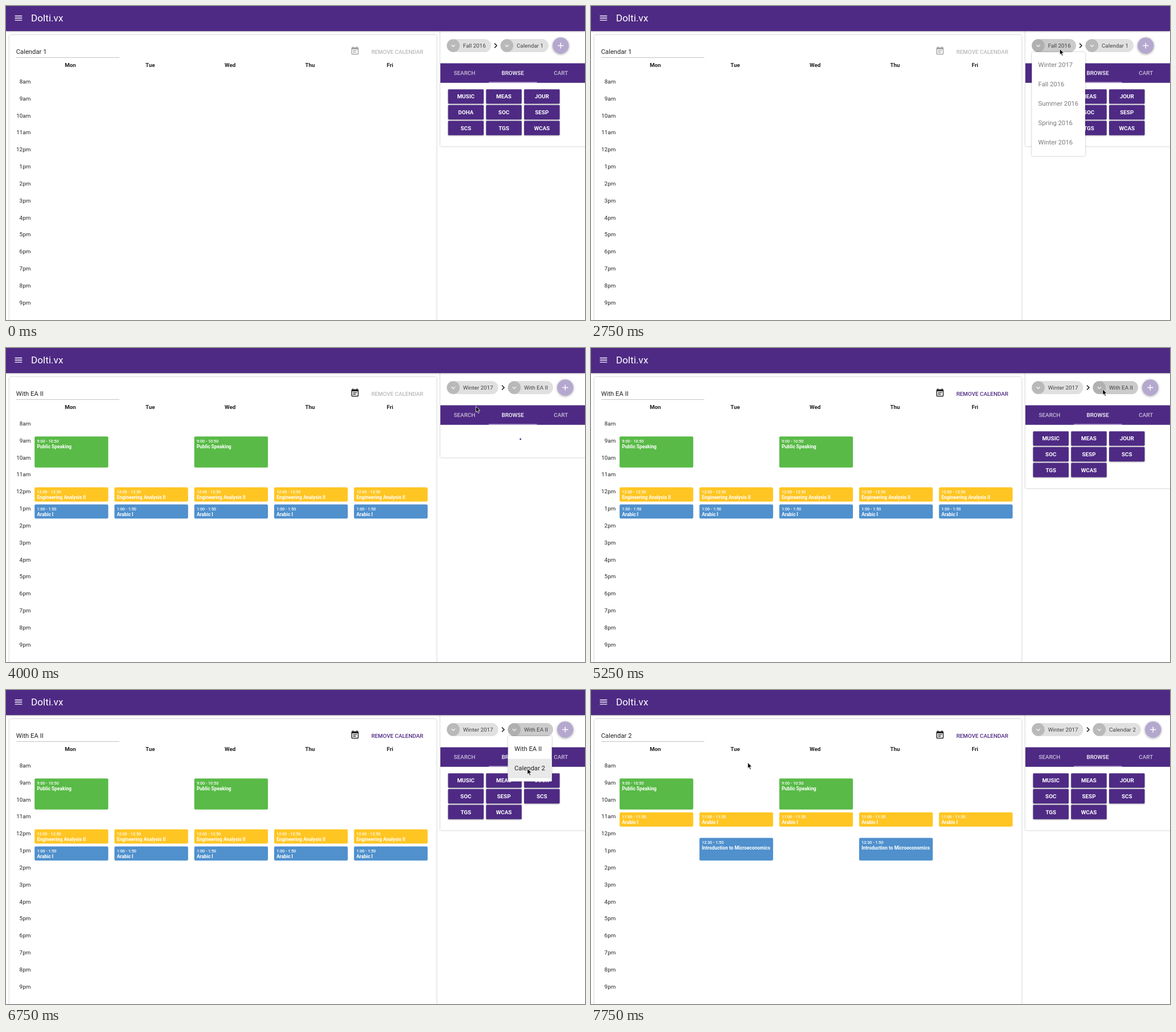
An HTML page that plays this animation: 1017x551 px, repeating every 8 s.

```html
<!DOCTYPE html>
<html lang="en">
<head>
<meta charset="utf-8">
<title>Class calendar</title>
<style>
  html, body { margin: 0; width: 100%; height: 100%; overflow: hidden; background: #fff; }
  svg { display: block; font-family: Roboto, Arial, sans-serif; font-size: 9.86px; }
  .card { fill: #fff; filter: drop-shadow(0 .7px 1.5px rgba(0, 0, 0, .3)); }
  .raised { filter: drop-shadow(0 1px 1px rgba(0, 0, 0, .3)); }
  .fab { filter: drop-shadow(0 1.5px 2px rgba(0, 0, 0, .35)); }
</style>
</head>
<body>
<svg id="stage" width="1017" height="551" viewBox="0 0 1017 551"></svg>
<script>
const stage = document.getElementById('stage');
const LOOP = 8000, PURPLE = '#4e2a84', INK = '#212121';
const GREEN = '#59ba47', AMBER = '#ffc522', BLUE = '#4f90cd';

// Pointer positions: start time, x, y
const pointer = [
  [500, 717, 48], [750, 782, 73], [1000, 797, 71], [1250, 799, 72],
  [1750, 824, 88], [2000, 823, 77], [2250, 823, 75], [3000, 824, 78],
  [3250, 825, 98], [3500, 825, 102], [4750, 870, 87], [5000, 896, 71],
  [5250, 898.5, 72], [6250, 912, 104], [6500, 915.5, 137.5], [7750, 275, 127]
];
const times = [...new Set([0, 2750, 4000, 4250, 5750, 6000, 7250, ...pointer.map(p => p[0])])]
  .sort((a, b) => a - b);

const ALL = [0, 1, 2, 3, 4];
// Courses: days, start hour, end hour, time label, title, colour
const speaking = [[0, 2], 9, 10 + 5 / 6, '9:00 - 10:50', 'Public Speaking', GREEN];
const calendars = [
  { term: 'Fall 2016', name: 'Calendar 1', chip2: 868.5, end: 953, courses: [] },
  { term: 'Winter 2017', name: 'With EA II', chip2: 881.5, end: 961, courses: [
    speaking,
    [ALL, 12, 12 + 5 / 6, '12:00 - 12:50', 'Engineering Analysis II', AMBER],
    [ALL, 13, 13 + 5 / 6, '1:00 - 1:50', 'Arabic I', BLUE]] },
  { term: 'Winter 2017', name: 'Calendar 2', chip2: 881.5, end: 966, courses: [
    speaking,
    [ALL, 11, 11 + 5 / 6, '11:00 - 11:50', 'Arabic I', AMBER],
    [[1, 3], 12.5, 13 + 5 / 6, '12:30 - 1:50', 'Introduction to Microeconomics', BLUE]] }
];
const terms = ['Winter 2017', 'Fall 2016', 'Summer 2016', 'Spring 2016', 'Winter 2016'];

const rect = (x, y, w, h, fill, more = '') =>
  `<rect x="${x}" y="${y}" width="${w}" height="${h}" fill="${fill}" ${more}/>`;
const text = (x, y, s, fill = INK, more = '') =>
  `<text x="${x}" y="${y}" fill="${fill}" ${more}>${s}</text>`;
const line = (d, color, width) =>
  `<path d="${d}" fill="none" stroke="${color}" stroke-width="${width}"/>`;
const MID = 'text-anchor="middle"', BIG = 'font-size="11.27"';
const MEDIUM = MID + ' font-weight="500"', BOLD = MID + ' font-weight="700"';

function header() {
  return rect(0, 0, 1017, 44, PURPLE, 'class="raised"') +
    line('M15.6 17.5h12.7m-12.7 3.7h12.7m-12.7 3.7h12.7', '#fff', 1.4) +
    text(44, 27, 'Dolti.vx', '#fff', 'font-size="17.2"');
}

function course([days, from, to, label, title, color]) {
  const y = 125.3 + (from - 8) * 29.83;
  return days.map(d => {
    const x = 50.2 + d * 140.25;
    return rect(x, y, 129.4, (to - from) * 29.83, color, 'rx="2.2"') +
      text(x + 4.2, y + 10.7, label, '#fff', 'font-size="7.2" font-weight="500"') +
      text(x + 4.2, y + 20.6, title, '#fff', 'font-size="8.4" font-weight="700"');
  }).join('');
}

function calendar(cal, t) {
  let out = rect(6, 51, 750, 520, '#fff', 'class="card" rx="1.4"') +
    text(17.7, 83.7, cal.name, INK, BIG) + rect(18, 90, 181, .8, '#b5b5b5') +
    `<path transform="translate(604.5 70.4) scale(.704)" fill="${t < 4000 ? '#a3a3a3' : INK}" fill-rule="evenodd"
      d="M17 10H7v2h10zM19 3h-1V1h-2v2H8V1H6v2H5a2 2 0 0 0-2 2v14a2 2 0 0 0 2 2h14a2 2 0 0 0 2-2V5a2 2 0 0 0-2-2zm0 16H5V8h14zm-5-5H7v2h7z"/>` +
    text(687.3, 83.5, 'REMOVE CALENDAR', t < 4250 ? '#b9b9b9' : PURPLE, MEDIUM);
  ['Mon', 'Tue', 'Wed', 'Thu', 'Fri'].forEach((d, i) => out += text(113 + i * 140.35, 107.3, d, INK, BOLD));
  for (let i = 0; i < 14; i++)
    out += text(43.3, 136 + i * 29.83, (i + 7) % 12 + 1 + (i < 4 ? 'am' : 'pm'), INK, 'text-anchor="end"');
  return out + cal.courses.map(course).join('');
}

function chip(x, end, label, hover) {
  return rect(x, 58, end - x, 23, hover ? '#cbcbcb' : '#e0e0e0', 'rx="11.5"') +
    `<circle cx="${x + 11.3}" cy="69.5" r="11.3" fill="${hover ? '#b0b0b0' : '#b9b9b9'}"/>` +
    line(`M${x + 8.2} 68.2l3.1 3.1 3.1-3.1`, '#fff', 1.2) +
    text(x + 28.4, 73, label, '#424242');
}

function panel(cal, t) {
  const loading = t >= 4000 && t < 4250;
  const plus = cal.end + 21.3, chevron = cal.chip2 - 10.4;
  let out = rect(763, 40, 260, loading ? 152 : 206, '#fff', 'class="card" rx="1.4"') +
    chip(774.3, t < 4000 ? 852 : 864.7, cal.term, t >= 2250 && t < 4000) +
    line(`M${chevron} 65.6l3.9 3.9-3.9 3.9`, INK, 1.5) +
    chip(cal.chip2, cal.end, cal.name, t >= 5000 && t < 7250) +
    `<circle class="fab" cx="${plus}" cy="69.5" r="14.2" fill="#b5a8cf"/>` +
    line(`M${plus - 5} 69.5h10m-5-5v10`, '#fff', 1.4) +
    rect(763, 100.5, 254, 34.3, PURPLE) + rect(848, 133.3, 84.6, 1.5, '#b9a9d8');
  ['SEARCH', 'BROWSE', 'CART'].forEach((s, i) =>
    out += text(805.4 + i * 84.7, 121.4, s, i === 1 ? '#fff' : '#cabfda', MEDIUM));
  if (loading) return out + `<circle cx="903.6" cy="160" r="1.4" fill="#3d1f9c"/>`;
  const schools = ['MUSIC', 'MEAS', 'JOUR', 'DOHA', 'SOC', 'SESP', 'SCS', 'TGS', 'WCAS']
    .filter(s => t < 4000 || s !== 'DOHA');
  schools.forEach((s, i) => {
    const x = 776.5 + i % 3 * 66.75, y = 146.2 + Math.floor(i / 3) * 27.65;
    out += rect(x, y, 62.5, 25.3, PURPLE, 'class="raised" rx="1.4"') +
      text(x + 31.25, y + 16.2, s, '#fff', BOLD);
  });
  return out;
}

function menu(x, w, items, active, boxAlpha, textAlpha) {
  return `<g opacity="${boxAlpha}">` +
    rect(x, 81, w, items.length * 34.1 + 11.4, '#fff', 'class="card" rx="1.4"') +
    (active < 0 ? '' : rect(x, 86.7 + active * 34.1, w, 34.1, '#e9e9e9')) +
    items.map((s, i) => text(x + 11.3, 107 + i * 34.1, s, INK, `${BIG} opacity="${textAlpha}"`)).join('') + '</g>';
}

function menus(t) {
  if (t >= 2750 && t < 4000)
    return menu(774.3, 93.7, terms, t < 3250 ? -1 : 0, 1, t < 3000 ? .6 : 1);
  if (t >= 5750 && t < 7250)
    return menu(881.7, 77, ['With EA II', 'Calendar 2'], t < 6250 ? -1 : t < 6500 ? 0 : 1,
      t < 6000 ? .6 : 1, t < 6250 ? .7 : 1);
  return '';
}

function arrow(t) {
  const p = pointer.filter(q => q[0] <= t).pop();
  return p ? `<path transform="translate(${p[1] + .3} ${p[2] + .3})" fill="#000" stroke="#fff" stroke-width=".8"
    d="M0 0V10.2L2.3 8.1 4 12.1 5.7 11.4 4.1 7.5H7.3Z"/>` : '';
}

function render(t) {
  const cal = calendars[t < 4000 ? 0 : t < 7250 ? 1 : 2];
  stage.innerHTML = calendar(cal, t) + panel(cal, t) + header() + menus(t) + arrow(t);
}

let shown = -1;
function tick() {
  const now = performance.now() % LOOP;
  const t = times.filter(s => s <= now).pop();
  if (t !== shown) render(shown = t);
  requestAnimationFrame(tick);
}
tick();
</script>
</body>
</html>
```
